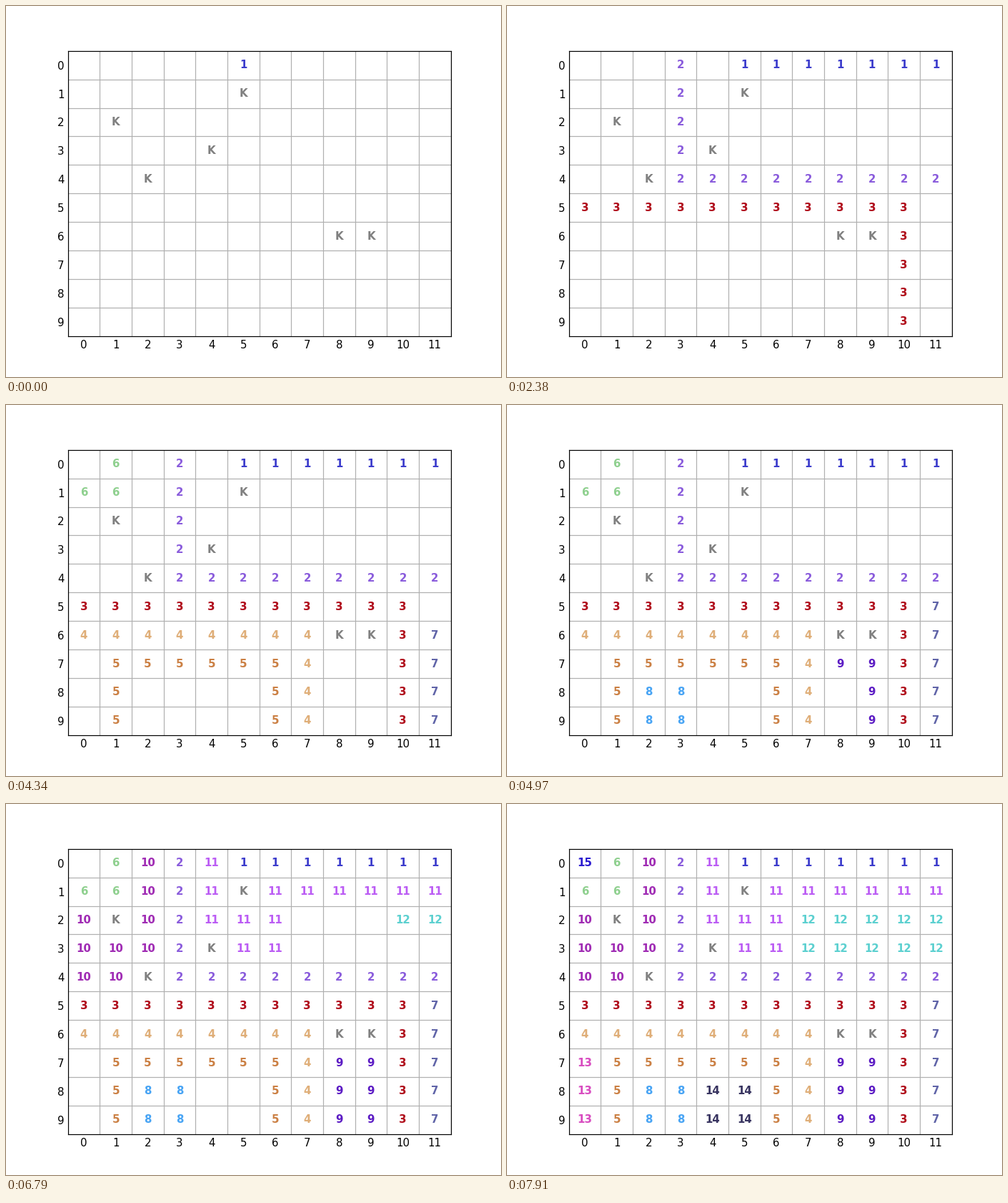
A matplotlib script for the animation above (7.98 s loop, 693 by 519 pixels).

```python
import matplotlib.pyplot as plt
from matplotlib.animation import FuncAnimation

WIDTH, HEIGHT, DPI = 693, 519, 100
COLS, ROWS = 12, 10
STONES = [(5, 1), (1, 2), (4, 3), (2, 4), (8, 6), (9, 6)]
HEADINGS = {"up": (0, -1), "down": (0, 1), "left": (-1, 0), "right": (1, 0)}
CW, CCW = 1, -1

# Entry column, entry row, heading, preferred turn, colour
WALKS = [
    (5, 0, "down", CCW, "#3c3ccc"),
    (11, 4, "left", CW, "#8a5cdc"),
    (10, 9, "up", CCW, "#b00e1c"),
    (7, 9, "up", CCW, "#dfae78"),
    (1, 9, "up", CW, "#cb8044"),
    (1, 0, "down", CW, "#8fd08f"),
    (11, 9, "up", CW, "#6064a8"),
    (3, 9, "up", CCW, "#48a4f4"),
    (9, 9, "up", CCW, "#5c1cc4"),
    (0, 2, "right", CCW, "#a02cb4"),
    (11, 1, "left", CW, "#bb5cf4"),
    (11, 2, "left", CCW, "#5cd0d0"),
    (0, 9, "up", CCW, "#d84cc0"),
    (4, 9, "up", CW, "#383460"),
    (0, 0, "down", CW, "#2c1cd0"),
]


def inside(x, y):
    return 0 <= x < COLS and 0 <= y < ROWS


def walk(x, y, heading, turn, taken):
    """Go straight, turn at obstacles, stop on leaving the grid."""
    dx, dy = HEADINGS[heading]
    while inside(x, y):
        taken.add((x, y))
        yield x, y
        side = (-dy * turn, dx * turn)
        options = [(dx, dy), side, (-side[0], -side[1])]
        free = [d for d in options if (x + d[0], y + d[1]) not in taken]
        if not free:
            return
        dx, dy = free[0]
        x, y = x + dx, y + dy


plt.rcParams.update({"font.size": 10.8, "axes.linewidth": 0.87})
fig, ax = plt.subplots(figsize=(WIDTH / DPI, HEIGHT / DPI), dpi=DPI)
fig.subplots_adjust(left=86.7 / WIDTH, right=622.6 / WIDTH,
                    top=1 - 62.7 / HEIGHT, bottom=1 - 461.8 / HEIGHT)
ax.set_xlim(-0.5, COLS - 0.5)
ax.set_ylim(ROWS - 0.5, -0.5)
ax.set_xticks(range(COLS))
ax.set_yticks(range(ROWS))
ax.set_xticks([c + 0.5 for c in range(COLS - 1)], minor=True)
ax.set_yticks([r + 0.5 for r in range(ROWS - 1)], minor=True)
ax.tick_params(which="both", length=0, pad=3.8)
ax.grid(which="minor", color="#b0b0b0", linewidth=0.87)


def put(x, y, label, color):
    return ax.text(x, y, label, color=color, weight="bold",
                   ha="center", va="center")


for x, y in STONES:
    put(x, y, "K", "#808080")

taken = set(STONES)
marks = []
for number, (x, y, heading, turn, color) in enumerate(WALKS, 1):
    for cx, cy in walk(x, y, heading, turn, taken):
        marks.append(put(cx, cy, str(number), color))


def update(step):
    for i, mark in enumerate(marks):
        mark.set_visible(i <= step)
    return marks


anim = FuncAnimation(fig, update, frames=len(marks), interval=70,
                     repeat=True, repeat_delay=0)
plt.show()
```
